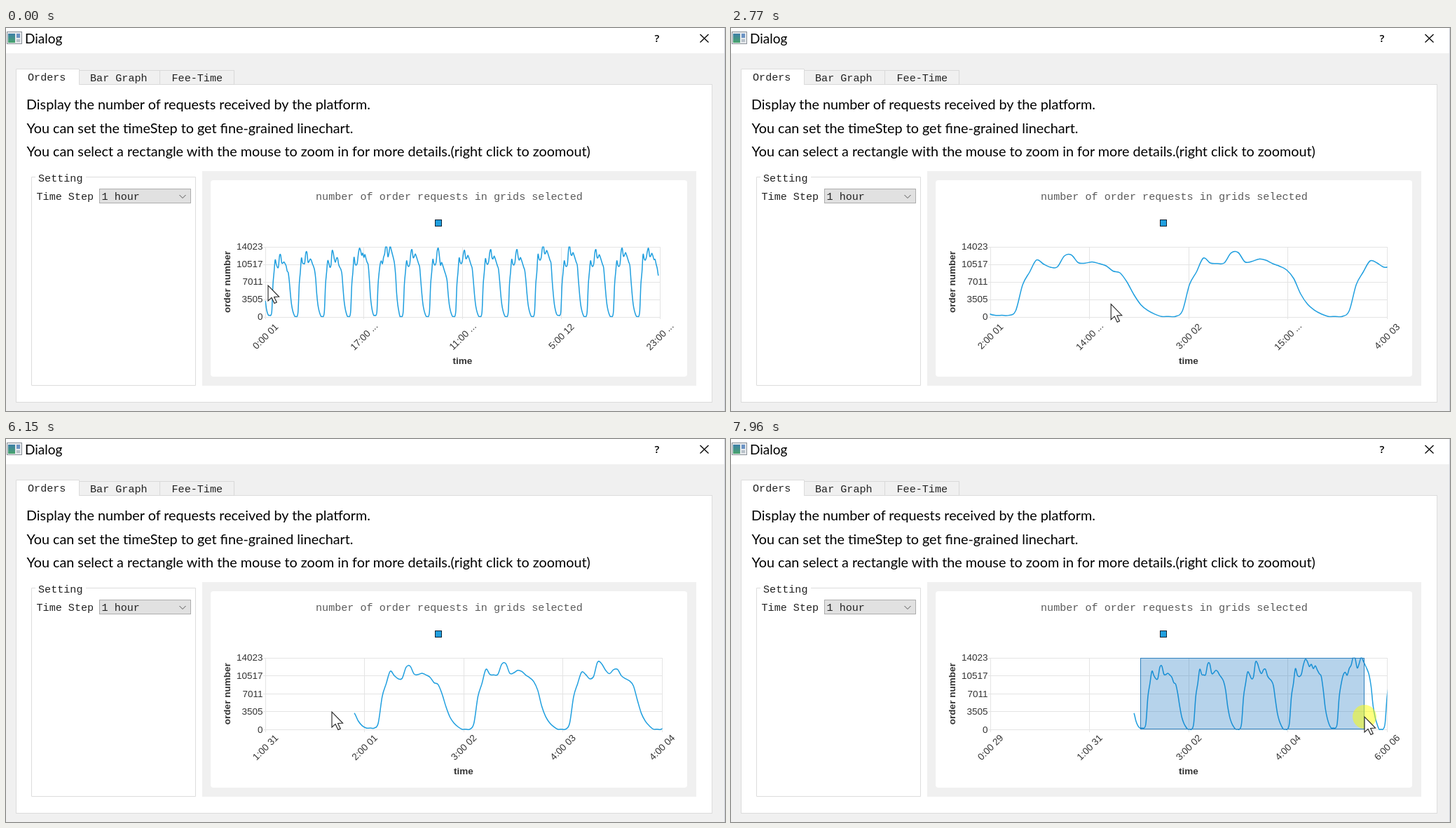
Animation of 1026x546 px, one loop 8 s. Source, as an HTML page:

```html
<!DOCTYPE html>
<html lang="en">
<head>
<meta charset="utf-8">
<title>Dialog</title>
<style>
html, body { margin: 0; height: 100%; overflow: hidden; background: #f0f0f0; }
svg { display: block; width: 100vw; height: 100vh; }
text { white-space: pre; }
.ui { font: 19.8px Lato, sans-serif; }
.mono { font: 15.12px "Liberation Mono", monospace; fill: #222; }
.axis { font: 13.5px "Liberation Sans", Arial, sans-serif; fill: #333; }
.bold { font-weight: bold; text-anchor: middle; }
.box { fill: #fff; stroke: #dcdcdc; }
.tab { fill: #f0f0f0; stroke: #d9d9d9; }
.grid { fill: none; stroke: #e4e4e4; shape-rendering: crispEdges; }
</style>
</head>
<body>
<svg viewBox="0 0 1026 546" preserveAspectRatio="none">
  <defs>
    <clipPath id="clip"><rect id="clipRect" x="369.5" y="311.5"/></clipPath>
    <linearGradient id="teal" x2="0" y2="1">
      <stop stop-color="#3d7fa8"/><stop offset="1" stop-color="#4aa56c"/>
    </linearGradient>
  </defs>

  <rect width="1026" height="546" fill="#f0f0f0"/>
  <rect width="1026" height="36" fill="#fff"/>
  <rect x="1025" width="1" height="546" fill="#cfd2da"/>
  <rect x="1.5" y="5.5" width="21" height="17" fill="#e6e9ec" stroke="#8b9299"/>
  <rect x="3" y="8" width="10" height="13" fill="url(#teal)"/>
  <rect x="15" y="8" width="5" height="6" fill="#6b93c4"/>
  <rect x="15" y="16" width="5" height="4" fill="#b9c2ca"/>
  <text class="ui" x="27" y="21.5" style="font-size:19px">Dialog</text>
  <text x="929" y="20" text-anchor="middle" style="font:600 15px 'Open Sans',sans-serif">?</text>
  <path d="M990.5 9L1002.5 20.5M1002.5 9L990.5 20.5" stroke="#000" stroke-width="1.3"/>

  <rect class="box" x="14.5" y="80.5" width="993" height="453"/>
  <rect class="tab" x="104.5" y="60.5" width="115" height="20"/>
  <rect class="tab" x="219.5" y="60.5" width="106" height="20"/>
  <path class="box" d="M14.5 81V58.5H104.5V81"/>
  <text class="mono" x="31" y="75">Orders</text>
  <text class="mono" x="120" y="76">Bar Graph</text>
  <text class="mono" x="236.5" y="76">Fee-Time</text>

  <text class="ui" x="29" y="116">Display the number of requests received by the platform.</text>
  <text class="ui" x="29.5" y="149.5">You can set the timeStep to get fine-grained linechart.</text>
  <text class="ui" x="29.5" y="183">You can select a rectangle with the mouse to zoom in for more details.(right click to zoomout)</text>

  <path class="box" d="M42 212.5H36.5V509.5H270.5V212.5H114"/>
  <text class="mono" x="46" y="219">Setting</text>
  <text class="mono" x="43.5" y="245">Time Step</text>
  <rect x="133.5" y="229.5" width="130" height="20" fill="#e1e1e1" stroke="#adadad"/>
  <text class="mono" x="136.5" y="245">1 hour</text>
  <path d="M247.5 238L252 242.5L256.5 238" fill="none" stroke="#555"/>

  <rect x="280" y="204" width="705" height="306" fill="#f0f0f0"/>
  <rect x="292" y="217" width="680" height="280" rx="4" fill="#fff"/>
  <text class="mono" x="442" y="245" style="fill:#5a5a5a">number of order requests in grids selected</text>
  <rect x="612.5" y="273.5" width="9" height="9" fill="#209fdf" stroke="#123"/>

  <path id="grid" class="grid"/>
  <g id="labels"></g>
  <text id="timeTitle" class="axis bold">time</text>
  <text id="orderTitle" class="axis bold">order number</text>
  <path id="curve" clip-path="url(#clip)" fill="none" stroke="#209fdf" stroke-width="1.5"/>
  <rect id="band" y="312.5" fill="#0066b8" fill-opacity=".285" stroke="#2f80bd"/>
  <circle id="press" r="17" fill="#ffff00" fill-opacity=".5"/>
  <path id="cursor" d="M0 0V22L5 17.4L9 25.5L12.3 24L8.6 16.4L15.6 16Z" fill="#fff" stroke="#222" stroke-width="1.1"/>
</svg>

<script>
const LOOP = 8000, LEFT = 370, TOP = 312, ZOOM_MS = 900, ZOOM_LEAD = 60, FRAME_MS = 92.5;
const $ = id => document.getElementById(id);
const mix = (a, b, k) => a + (b - a) * k;

// Hours 9 to 23 of the first five days, in percent of the axis maximum.
const detailed = [
  [81.3, 75.5, 71, 71.5, 87, 88.5, 77.5, 76.8, 78.5, 76.2, 73, 65.5, 63, 50, 32],
  [84, 77, 76.3, 77, 91.3, 92, 78.5, 79.2, 82.6, 81, 76, 72.3, 67, 55, 33],
  [80, 77, 71, 74, 94, 92, 83, 78, 83.5, 84, 75, 71, 68, 61, 41],
  [85, 76, 74, 77, 90, 98, 95, 88, 91, 85, 89, 83, 78, 74, 55],
  [76, 80, 76, 85, 90, 101, 99, 86, 92, 101, 96, 90, 84, 76, 60]
];
// Later days: morning, noon and afternoon peaks.
const peaks = [
  [80, 96, 90], [82, 98, 78], [84, 95, 88], [83, 96, 87], [82, 96, 85],
  [89, 102, 95], [80, 101, 92], [80, 96, 89], [80, 98, 92], [89, 98, 91]
];
const dayShape = ([a, b, c]) => [
  a, a - 6, a - 8, a - 4, b - 4, b, b - 11, c - 4, c, c - 4, c - 9, c - 14, c - 19, 52, 33
];

function buildSeries() {
  const values = [];
  let last = 42;
  [...detailed, ...peaks.map(dayShape)].forEach((day, i) => {
    const floor = [0, 4, 11].includes(i) ? 2.4 : 0.8;
    const night = [.55, .29, .13].map(k => Math.max(floor, last * k));
    values.push(...night, floor, floor, floor, 9, 46, 64, ...day);
    last = day[14];
  });
  values.splice(-4, 4, 82, 75, 69, 59);
  return values;
}
const series = buildSeries();

// x0 is the place of the first hour, step the width of one hour.
const views = [
  { start: 0, x0: 370, step: 1.5625, right: 933, bottom: 412, timeY: 479,
    ticks: ["0:00 01", "17:00 ...", "11:00 ...", "5:00 12", "23:00 ..."] },
  { start: 2490, x0: 342.6, step: 11.42, right: 936, bottom: 412, timeY: 479,
    ticks: ["2:00 01", "14:00 ...", "3:00 02", "15:00 ...", "4:00 03"] },
  { start: 5320, x0: 497, step: 5.69, right: 936, bottom: 414.5, timeY: 478,
    ticks: ["1:00 31", "2:00 01", "3:00 02", "4:00 03", "4:00 04"] },
  { start: 6330, x0: 575, step: 2.844, right: 936, bottom: 414.5, timeY: 478,
    ticks: ["0:00 29", "1:00 31", "3:00 02", "4:00 04", "6:00 06"] }
];

// Pointer moves: first change, last change, number of changes, x, y.
const moves = [
  [1170, 1430, 4, 443, 361], [1610, 1610, 1, 446, 360], [1800, 1860, 2, 456, 359],
  [2490, 3230, 9, 650, 437], [4230, 4230, 1, 667, 438], [4510, 5060, 7, 465, 389],
  [6400, 6860, 5, 558, 391], [7040, 7040, 1, 562, 390], [7140, 7330, 3, 585, 388],
  [7520, 7960, 6, 904, 396]
];
const drags = [
  { press: 890, drag: 1170, end: 2490, x: 373.5 },
  { press: 7330, drag: 7520, end: LOOP, x: 584.5 }
];

function pointerAt(t) {
  let x = 374, y = 367;
  for (const [from, to, count, nx, ny] of moves) {
    if (t < from) break;
    const k = t >= to ? 1 : (Math.floor((t - from) / (to - from) * (count - 1)) + 1) / count;
    x = mix(x, nx, k);
    y = mix(y, ny, k);
  }
  return { x, y };
}

function curvePath({ x0, step, bottom }) {
  const scale = (bottom - TOP) / 100;
  const value = i => series[Math.max(0, Math.min(series.length - 1, i))];
  const point = (x, v) => (x0 + x * step).toFixed(2) + " " + (bottom - v * scale).toFixed(2);
  const slope = i => (value(i + 1) - value(i - 1)) / 6;
  let d = "M" + point(0, value(0));
  for (let i = 1; i < series.length; i++) {
    d += "C" + point(i - 2 / 3, value(i - 1) + slope(i - 1)) + " " +
      point(i - 1 / 3, value(i) - slope(i)) + " " + point(i, value(i));
  }
  return d;
}

function setAttrs(el, attrs) {
  for (const key in attrs) el.setAttribute(key, attrs[key]);
}

function layoutAxes({ right, bottom, timeY, ticks }) {
  let grid = "", labels = "";
  ticks.forEach((tick, i) => {
    const x = mix(LEFT, right, i / 4), y = mix(TOP, bottom, i / 4);
    const gx = Math.floor(x) + .5, gy = Math.floor(y) + .5;
    grid += `M${gx} ${TOP}V${bottom + 3}M${LEFT - 3} ${gy}H${right}`;
    labels += `<text class="axis" text-anchor="end" x="366.5" y="${y + 4.3}">${[14023, 10517, 7011, 3505, 0][i]}</text>` +
      `<text class="axis" text-anchor="middle" y="4.8" transform="translate(${x} 439.5) rotate(-45)">${tick}</text>`;
  });
  $("grid").setAttribute("d", grid);
  $("labels").innerHTML = labels;
  setAttrs($("timeTitle"), { x: (LEFT + right) / 2, y: timeY });
  $("orderTitle").setAttribute("transform", `translate(320 ${(TOP + bottom) / 2}) rotate(-90)`);
  setAttrs($("clipRect"), { width: right - LEFT + 1, height: bottom - TOP + 1 });
}

let shownView = -1, shownPath = "";

function drawChart(t) {
  const index = views.findLastIndex(v => t >= v.start);
  const view = views[index], before = views[Math.max(0, index - 1)];
  if (index !== shownView) {
    layoutAxes(view);
    shownView = index;
  }
  const elapsed = Math.floor((t - view.start) / FRAME_MS) * FRAME_MS + ZOOM_LEAD;
  const k = index ? 1 - (1 - Math.min(1, elapsed / ZOOM_MS)) ** 4 : 1;
  const key = index + ":" + k;
  if (key === shownPath) return;
  shownPath = key;
  $("curve").setAttribute("d", curvePath({
    x0: mix(before.x0, view.x0, k),
    step: mix(before.step, view.step, k),
    bottom: mix(before.bottom, view.bottom, k)
  }));
}

function drawPointer(t) {
  const { x, y } = pointerAt(t);
  const active = drags.find(d => t >= d.press && t < d.end);
  const dragging = active && t >= active.drag;
  $("cursor").setAttribute("transform", `translate(${x} ${y})`);
  $("cursor").setAttribute("fill-opacity", t >= 3230 && t < 3790 ? .2 : 1);
  setAttrs($("press"), { cx: x, cy: y, visibility: active ? "visible" : "hidden" });
  $("band").setAttribute("visibility", dragging ? "visible" : "hidden");
  if (dragging) {
    setAttrs($("band"), {
      x: active.x,
      width: Math.max(0, Math.round(x) - .5 - active.x),
      height: Math.floor(views[shownView].bottom) - TOP - 1
    });
  }
}

const began = performance.now();
function frame() {
  const t = (performance.now() - began) % LOOP;
  drawChart(t);
  drawPointer(t);
  requestAnimationFrame(frame);
}
frame();
</script>
</body>
</html>
```
